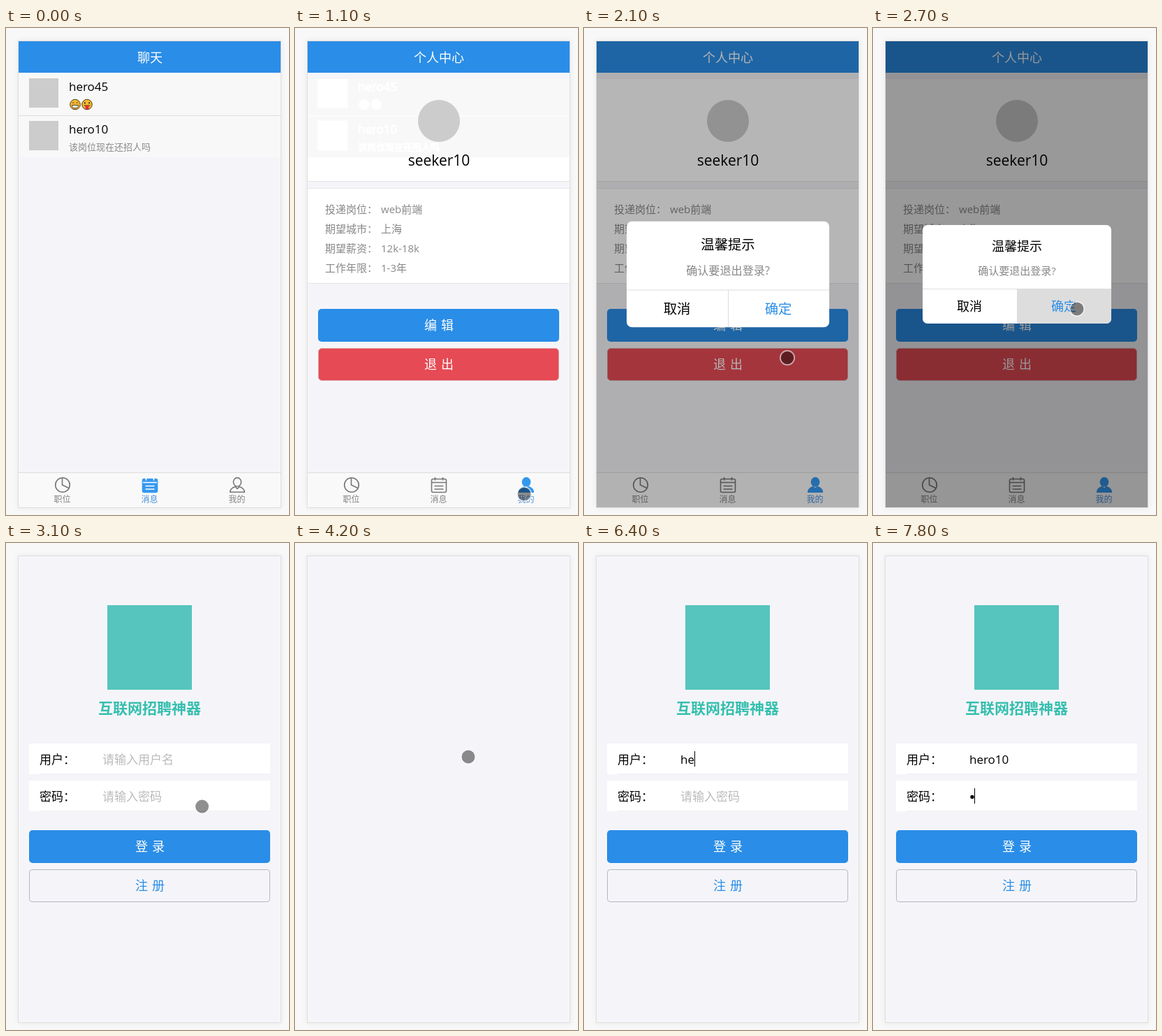
Animation, 405 px wide and 697 px high, one loop 8000 ms. Source, as an HTML page:

```html
<!DOCTYPE html>
<html lang="zh-CN">
<head>
<meta charset="utf-8">
<title>聊天</title>
<style>
html, body { margin: 0; width: 100%; height: 100%; overflow: hidden; background: #f8f8f8; }
svg { display: block; font-family: "Open Sans", "Noto Sans CJK SC", "Noto Sans CJK", sans-serif; }
.mid { text-anchor: middle; }
.big { font-size: 18px; text-anchor: middle; word-spacing: 1.3px; }
.white { fill: #fff; }
.blue { fill: #2a8de7; }
.grey { fill: #888; }
.field { font-size: 17px; }
.hint { fill: #bbb; }
.line { stroke: #ddd; fill: none; }
.name { font-size: 17px; }
.ghost > * { fill: #fff; stroke: #fff; }
.ghost > .row { fill: #f8f8f8; stroke: none; }
.tab text { font-size: 12px; text-anchor: middle; fill: #858585; }
.tab path, .tab circle, .tab ellipse { fill: none; stroke: #777; stroke-width: 1.6; }
.tab.on text { fill: #4a8fdc; }
.tab.on .body { fill: #3598f0; stroke: #3598f0; }
.tab.on .detail { stroke: #fff; }
</style>
</head>
<body>
<svg width="405" height="697" viewBox="0 0 405 697">
  <defs>
    <filter id="soft" x="-10%" y="-10%" width="120%" height="120%"><feGaussianBlur stdDeviation="5"/></filter>
  </defs>
  <rect width="405" height="697" fill="#f8f8f8"/>
  <rect x="17" y="18" width="377" height="669" opacity=".06" filter="url(#soft)"/>
  <rect x="17.5" y="18.5" width="376" height="668" fill="#f5f5f9" stroke="#dedede"/>

  <g id="cards">
    <rect x="18" y="64" width="375" height="155" class="white"/>
    <rect x="18" y="229" width="375" height="136" class="white"/>
    <path d="M18 219.5H393M18 229.5H393M18 365.5H393" class="line" stroke-opacity=".7"/>
  </g>

  <g id="rows">
    <rect x="18" y="64" width="375" height="121" fill="#f8f8f8" class="row"/>
    <path d="M18 125.5H393" class="line"/>
    <rect x="33" y="72" width="42" height="42" fill="#ccc"/>
    <rect x="33" y="133" width="42" height="42" fill="#ccc"/>
    <text x="90" y="90" class="name">hero45</text>
    <text x="90" y="151" class="name">hero10</text>
    <text x="90" y="175" font-size="13" class="grey">该岗位现在还招人吗</text>
    <circle cx="99" cy="109.5" r="7.3" fill="#f7b932" stroke="#4a3a18"/>
    <path d="M95 107.5q1.3-2 2.6 0M100.4 107.5q1.3-2 2.6 0" fill="none" stroke="#332"/>
    <path d="M94.5 110.5h9q-.5 4.3-4.5 4.3t-4.5-4.3z" fill="#fff" stroke="#443"/>
    <circle cx="116" cy="109.5" r="7.3" fill="#f7b932" stroke="#4a3a18"/>
    <path d="M112.8 106v2.4M119.2 106v2.4" stroke="#332" stroke-width="1.6"/>
    <path d="M111.5 111h9" stroke="#332"/>
    <path d="M113.5 111h5v3a2.5 2.5 0 0 1-5 0z" fill="#e8283c"/>
  </g>

  <g id="profile">
    <rect x="18" y="64" width="375" height="9" fill="#f5f5f9"/>
    <circle cx="206" cy="133" r="30" fill="#ccc"/>
    <text x="206" y="197" font-size="21" class="mid">seeker10</text>
    <g font-size="15" class="grey">
      <text x="43" y="265">投递岗位：</text><text x="123" y="265">web前端</text>
      <text x="43" y="293">期望城市：</text><text x="123" y="293">上海</text>
      <text x="43" y="321">期望薪资：</text><text x="123" y="321">12k-18k</text>
      <text x="43" y="349">工作年限：</text><text x="123" y="349">1-3年</text>
    </g>
    <rect x="33" y="402" width="345" height="47" rx="5" class="blue"/>
    <text x="206" y="432" class="big white">编 辑</text>
    <rect x="33.5" y="458.5" width="344" height="46" rx="5" fill="#e64a54" stroke="#dca9ae"/>
    <text x="206" y="488" class="big white">退 出</text>
  </g>

  <g id="chrome">
    <rect x="18" y="19" width="375" height="45" class="blue"/>
    <text id="title" x="206" y="49" class="big white"></text>
    <rect x="18" y="636" width="375" height="50" fill="#f9f9f9"/>
    <path d="M18 636.5H393" class="line"/>
    <g class="tab">
      <circle cx="81" cy="654" r="10.3"/>
      <path d="M80.5 644V654L90 658.5"/>
      <text x="80.5" y="679">职位</text>
    </g>
    <g class="tab" id="chatTab">
      <path class="body" d="M197.5 645.5h17q2 0 2 2v15q0 2-2 2h-17q-2 0-2-2v-15q0-2 2-2z"/>
      <path class="detail" d="M196 650.5h20M199.5 655.5h13M199.5 660h13M200.5 643v4.5M211.5 643v4.5"/>
      <text x="205.5" y="679">消息</text>
    </g>
    <g class="tab" id="meTab">
      <path class="body" d="M320.8 664.2c0-5 3.5-6.6 7-7.8l3.2 3 3.2-3c3.5 1.2 7 2.8 7 7.8z"/>
      <ellipse class="body" cx="331" cy="649.8" rx="5.6" ry="6.2"/>
      <text x="330.5" y="679">我的</text>
    </g>
  </g>

  <g id="login">
    <rect x="145" y="89" width="121" height="121" fill="#56c5bd"/>
    <text x="205.5" y="243.5" font-size="21" font-weight="700" fill="#35bfae" class="mid">互联网招聘神器</text>
    <rect x="33" y="287" width="345" height="44" class="white"/>
    <rect x="33" y="340" width="345" height="44" class="white"/>
    <path d="M48 330.5H378M48 383.5H378" stroke="#f0f0f3"/>
    <g class="field">
      <text x="48" y="316">用户：</text>
      <text x="48" y="369">密码：</text>
      <text id="userHint" x="138" y="316" class="hint">请输入用户名</text>
      <text id="passHint" x="138" y="369" class="hint">请输入密码</text>
      <text id="user" x="138" y="316"></text>
    </g>
    <circle id="dot" cx="142" cy="363.5" r="2.7"/>
    <rect id="caret" width="1" height="22"/>
    <rect x="33" y="411" width="345" height="47" rx="5" class="blue"/>
    <text x="206" y="441" class="big white">登 录</text>
    <rect x="33.5" y="467.5" width="344" height="46" rx="4" fill="none" stroke="#b4b7c0"/>
    <text x="206" y="497" class="big blue">注 册</text>
  </g>

  <rect id="mask" x="18" y="19" width="375" height="667"/>
  <g id="modal">
    <rect x="71" y="282" width="270" height="141" rx="7" class="white"/>
    <path id="pressed" d="M206 374H341V416a7 7 0 0 1-7 7H206Z" fill="#ddd"/>
    <path d="M71 373.5H341M206.5 374V423" class="line"/>
    <text x="206" y="319" class="big">温馨提示</text>
    <text x="206" y="353" font-size="15" class="mid grey">确认要退出登录?</text>
    <text x="138" y="405" class="big">取消</text>
    <text x="273" y="405" class="big blue">确定</text>
  </g>
  <g id="pointer">
    <circle r="10" fill="none" stroke="#fff" stroke-opacity=".6" stroke-width="2"/>
    <circle r="9.5" fill-opacity=".44"/>
  </g>
</svg>
<script>
const LOOP = 8000, STEP = 100;
const $ = id => document.getElementById(id);
const show = (id, on) => $(id).style.display = on ? "" : "none";
const within = (t, from, to) => t >= from && t < to;

// time, x, y
const path = [
  [200, 382, 331], [800, 328, 667], [1200, 328, 667], [1800, 291, 472],
  [2200, 291, 472], [2600, 292, 402], [2900, 292, 402], [3500, 248, 306],
  [4500, 248, 306], [5000, 228, 316], [6000, 228, 316]
];
const keyTimes = [6300, 6400, 6600, 6800, 7200, 7300];

function pointerAt(t) {
  const i = path.findIndex(p => p[0] > t);
  const [t0, x0, y0] = path[i - 1], [t1, x1, y1] = path[i];
  const p = (t - t0) / (t1 - t0), e = p * p * (3 - 2 * p);
  return [x0 + (x1 - x0) * e, y0 + (y1 - y0) * e];
}

const backOut = p => 1 + 2.70158 * (p - 1) ** 3 + 1.70158 * (p - 1) ** 2;

function drawApp(t) {
  const chat = t < 1100;
  show("cards", !chat);
  show("profile", !chat);
  show("rows", t < 1300);
  $("rows").classList.toggle("ghost", !chat);
  $("title").textContent = chat ? "聊天" : "个人中心";
  $("chatTab").classList.toggle("on", chat);
  $("meTab").classList.toggle("on", !chat);
}

function drawModal(t) {
  const p = Math.min(1, (t - 1884) / 300);
  $("mask").setAttribute("opacity", 0.4 * p);
  $("modal").setAttribute("transform",
    `translate(206 352.5) scale(${backOut(p)}) translate(-206 -352.5)`);
  show("pressed", t >= 2700);
}

function drawLogin(t) {
  const typed = keyTimes.filter(k => k <= t).length;
  const inPassword = t >= 7500, filled = t >= 7800;
  $("user").textContent = "hero10".slice(0, typed);
  show("userHint", !typed);
  show("passHint", !filled);
  show("dot", filled);
  show("caret", within(t, 5200, 5700) || t >= 6100);
  const offset = inPassword ? (filled ? 7 : 0)
    : typed ? $("user").getComputedTextLength() : 0;
  $("caret").setAttribute("x", Math.round(138 + offset));
  $("caret").setAttribute("y", inPassword ? 351 : 298);
}

function draw() {
  const now = performance.now() % LOOP, t = now - now % STEP;
  const app = t < 2800, login = !app && !within(t, 4200, 4500);
  const modal = within(t, 1900, 2800), pointer = within(t, 200, 6000);
  show("chrome", app);
  show("login", login);
  show("mask", modal);
  show("modal", modal);
  show("pointer", pointer);
  if (app) drawApp(t);
  else ["cards", "rows", "profile"].forEach(id => show(id, false));
  if (modal) drawModal(t);
  if (login) drawLogin(t);
  if (pointer) $("pointer").setAttribute("transform", `translate(${pointerAt(t)})`);
  requestAnimationFrame(draw);
}
draw();
</script>
</body>
</html>
```
